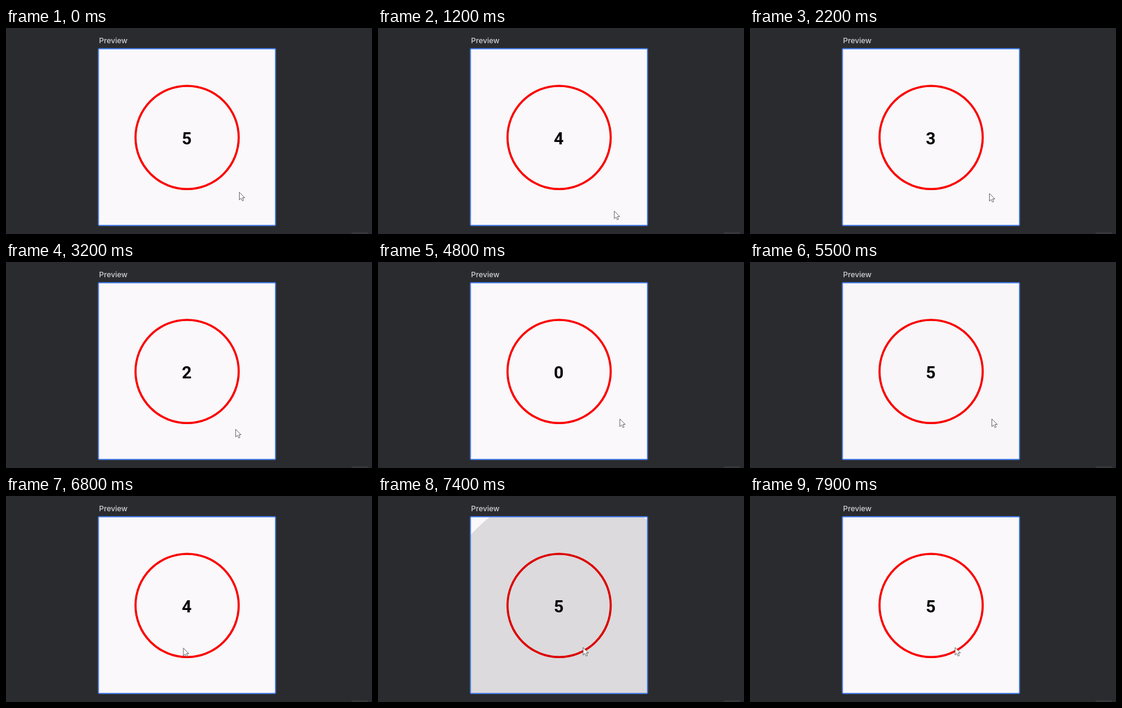
An HTML page for the animation above (8000 ms loop, 600x338 px).

```html
<!DOCTYPE html>
<html lang="en">
<head>
<meta charset="utf-8">
<title>Countdown preview</title>
<style>
  html, body { margin: 0; width: 100%; height: 100%; overflow: hidden; background: #2a2b2f; }
  svg { display: block; width: 100vw; height: 100vh; }
  .label { font: 500 12.3px Inter, sans-serif; fill: #cfd0d4; }
  .count { font: 700 28px Roboto, sans-serif; text-anchor: middle; fill: #060606; }
</style>
</head>
<body>
<svg viewBox="0 0 600 338">
  <defs>
    <clipPath id="panel"><rect x="152" y="34" width="290" height="290"/></clipPath>
  </defs>
  <rect width="600" height="338" fill="#2a2b2f"/>
  <rect x="566" y="335" width="28" height="8" rx="3" fill="#37383c"/>
  <text class="label" x="152.5" y="25">Preview</text>
  <rect x="152" y="34" width="290" height="290" fill="#faf8fa"/>
  <circle cx="296.9" cy="179.6" r="84.6" fill="none" stroke="#fa0000" stroke-width="3.5"/>
  <text class="count" id="count" x="296.3" y="190.8">5</text>
  <circle id="ripple" clip-path="url(#panel)" opacity="0"/>
  <rect x="151.5" y="34" width="290.3" height="290" rx="1.5" fill="none" stroke="#467ce2" stroke-width="1.8"/>
  <path id="cursor" d="M.5 .5V13L3.4 10.3L5.4 14.7L7.5 13.8L5.6 9.5H9.3Z"
        fill="#fff" stroke="#444" stroke-width=".8" stroke-linejoin="round"/>
</svg>
<script>
const LOOP = 8000, STEP = 100;
const CENTER = { x: 297, y: 179 };
const START_RADIUS = 87, END_RADIUS = 217;
const GROW = 225, FADE_IN = 75, FADE_OUT = 150, PEAK = 0.122;
const COUNT_FROM = 5, SECOND = 1000, RELEASE = 150;

// each press restarts the countdown; the first one comes before the loop starts
const PRESSES = [
  { at: -455, x: 382, y: 269 },
  { at: 5137, x: 396, y: 257 },
  { at: 7245, x: 336, y: 248 }
];

// resting points of the pointer tip, with eased moves between them
const STOPS = [
  { at: 400, x: 382, y: 269 },
  { at: 1300, x: 387, y: 301 },
  { at: 2200, x: 392, y: 271 },
  { at: 2700, x: 416, y: 274 },
  { at: 3200, x: 376, y: 274 },
  { at: 4700, x: 396, y: 257 },
  { at: 5500, x: 396, y: 257 },
  { at: 6400, x: 245, y: 250 },
  { at: 7200, x: 335.7, y: 248 }
];

const $ = id => document.getElementById(id);
const clamp = v => Math.min(1, Math.max(0, v));
const mix = (a, b, p) => a + (b - a) * p;
const smooth = p => p * p * (3 - 2 * p);

// cubic-bezier(.4, 0, .2, 1)
function fastOutSlowIn(x) {
  let lo = 0, hi = 1;
  for (let i = 0; i < 20; i++) {
    const s = (lo + hi) / 2;
    const bx = 1.2 * s * (1 - s) ** 2 + 0.6 * s * s * (1 - s) + s ** 3;
    if (bx < x) lo = s; else hi = s;
  }
  return 3 * lo * lo * (1 - lo) + lo ** 3;
}

function drawPointer(t) {
  const from = STOPS.findLast(s => s.at <= t) ?? STOPS[0];
  const to = STOPS.find(s => s.at > t) ?? from;
  const p = to === from ? 0 : smooth((t - from.at) / (to.at - from.at));
  $('cursor').setAttribute('transform', `translate(${mix(from.x, to.x, p)} ${mix(from.y, to.y, p)})`);
}

function drawCount(t) {
  const reset = PRESSES.findLast(p => p.at + RELEASE <= t).at + RELEASE;
  $('count').textContent = Math.max(0, COUNT_FROM - Math.floor((t - reset) / SECOND));
}

function drawRipple(t) {
  const press = PRESSES.findLast(p => p.at <= t);
  const age = t - press.at, p = clamp(age / GROW);
  const ripple = $('ripple');
  ripple.setAttribute('cx', mix(press.x, CENTER.x, p));
  ripple.setAttribute('cy', mix(press.y, CENTER.y, p));
  ripple.setAttribute('r', mix(START_RADIUS, END_RADIUS, fastOutSlowIn(p)));
  ripple.setAttribute('opacity', PEAK * clamp(age / FADE_IN) * (1 - clamp((age - GROW) / FADE_OUT)));
}

const start = performance.now();
function draw() {
  const elapsed = Math.max(0, performance.now() - start) % LOOP;
  const t = Math.floor(elapsed / STEP) * STEP;
  drawPointer(t);
  drawCount(t);
  drawRipple(t);
  requestAnimationFrame(draw);
}
draw();
</script>
</body>
</html>
```
